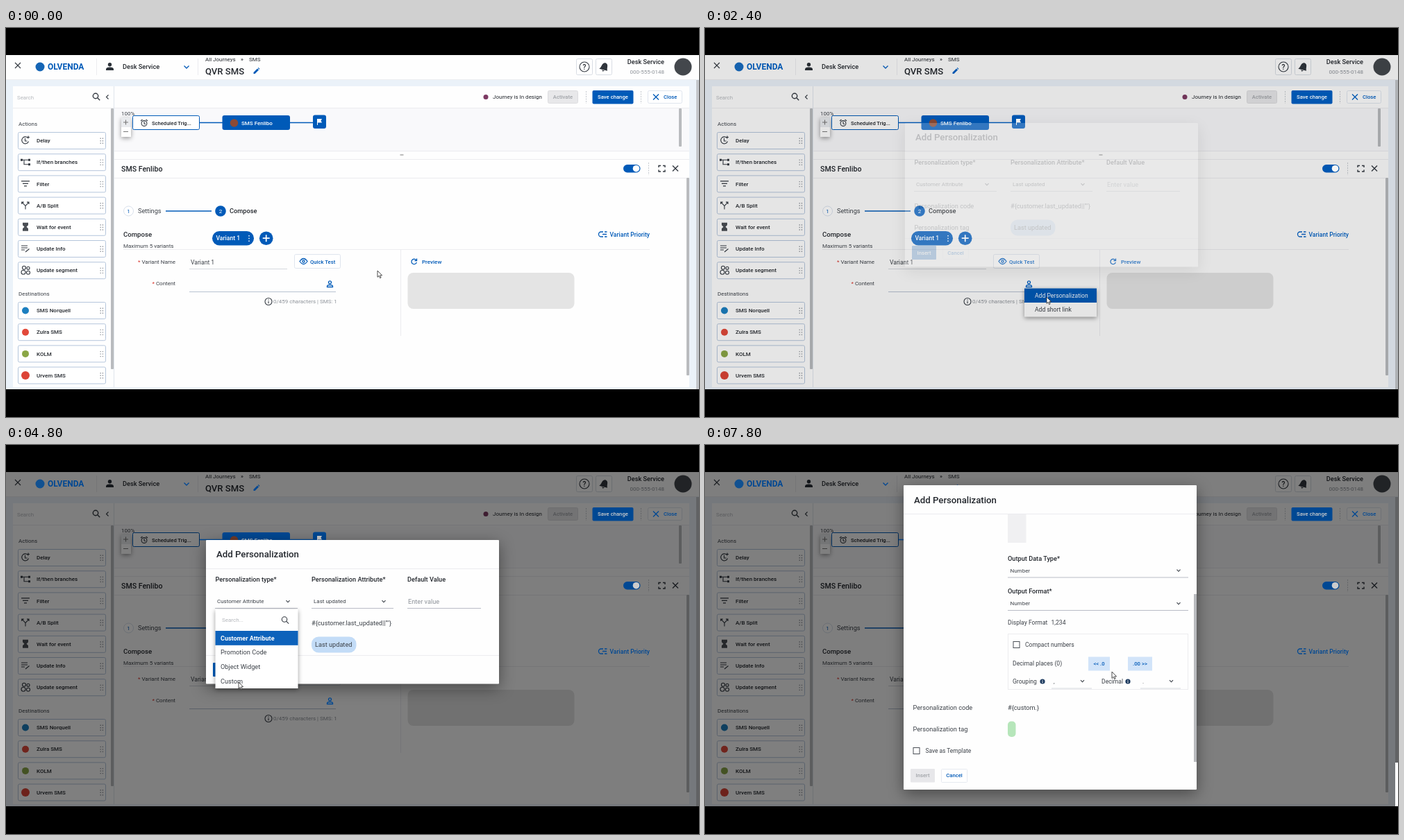
Write an HTML page that moves like this. It is 998 px wide and 561 px high and loops after 8 s.

```html
<!DOCTYPE html>
<html lang="en">
<head>
<meta charset="utf-8">
<title>Add personalization</title>
<style>
html, body { margin: 0; width: 100%; height: 100%; overflow: hidden; background: #000; }
svg { display: block; width: 998px; height: 561px; }
text { font: 8px Roboto, "Open Sans", sans-serif; fill: #3c4148; }
.b { font-weight: 500; fill: #23272d; }
.s { font-size: 7.7px; }
.l { font-size: 8.6px; }
.m { font-size: 9.2px; }
.h { font-size: 13.1px; }
.blue { fill: #005ab8; }
.white { fill: #fff; }
.grey { fill: #8d9299; }
.pale { fill: #b4b7bc; }
.red { fill: #d8342c; }
.mid { text-anchor: middle; }
.end { text-anchor: end; }
.ln { fill: none; stroke: #343a42; stroke-width: 1.1; }
.bl { fill: none; stroke: #005ab8; stroke-width: 1.3; }
.rule { fill: none; stroke: #ececef; }
.under { fill: none; stroke: #b9bcc6; }
.box { fill: #fff; stroke: #dfe5ee; }
.bar { fill: #b9bbbe; }
.pane { filter: drop-shadow(0 6px 11px rgba(0,0,0,.42)); }
.drop { filter: drop-shadow(0 2px 3px rgba(0,0,0,.4)); }

.anim { animation: 8s step-end infinite; }
.menu { animation-name: menu; }
.hover { animation-name: hover; }
.dim { animation-name: dim; }
.lit { animation-name: lit; }
.first { animation-name: first; }
.list { animation-name: list; }
.second { animation-name: second; }
.strip { animation-name: strip; }
.scroll { animation-name: scroll; }
.thumb { animation-name: thumb; }
.cursor { animation-name: cursor; }

@keyframes menu { 0% { opacity: 0 } 17.5% { opacity: 1 } 32.5%, 100% { opacity: 0 } }
@keyframes hover { 0% { opacity: 0 } 22.5%, 100% { opacity: 1 } }
@keyframes dim { 0% { opacity: 0 } 30% { opacity: .2 } 32.5%, 100% { opacity: 1 } }
@keyframes lit { 0% { filter: brightness(1) } 30% { filter: brightness(.96) } 32.5%, 100% { filter: brightness(.8) } }
@keyframes first { 0% { opacity: 0 } 30% { opacity: .2 } 32.5% { opacity: 1 } 65%, 100% { opacity: 0 } }
@keyframes list { 0% { opacity: 0 } 47.5% { opacity: .92 } 50% { opacity: 1 } 62.5%, 100% { opacity: 0 } }
@keyframes second { 0% { opacity: 0 } 65%, 100% { opacity: 1 } }
@keyframes strip { 0% { opacity: 0 } 67.5%, 100% { opacity: 1 } }
@keyframes scroll { 0% { transform: none } 92.5%, 100% { transform: translateY(-171px) } }
@keyframes thumb { 0% { transform: none } 92.5%, 100% { transform: translateY(115px) } }
@keyframes cursor {
  0% { transform: translate(535px, 350px); animation-timing-function: steps(6) }
  15% { transform: translate(466px, 366px) }
  17.5% { transform: translate(466px, 366px); animation-timing-function: steps(3) }
  25% { transform: translate(492px, 388px) }
  32.5% { transform: translate(492px, 388px); animation-timing-function: steps(5) }
  45% { transform: translate(391px, 227px) }
  47.5% { transform: translate(391px, 227px); animation-timing-function: steps(5) }
  60% { transform: translate(335px, 342px) }
  85% { transform: translate(335px, 342px); animation-timing-function: steps(2) }
  90%, 100% { transform: translate(586px, 327px) }
}
</style>
</head>
<body>
<svg viewBox="0 0 998 561">
<defs>
  <g id="card">
    <rect x=".5" y=".5" width="126" height="24" rx="2" fill="#fff" stroke="#b5c6dc"/>
    <path d="M119.2 8.5v9M122.4 8.5v9" stroke="#8d9299" stroke-width="1.3" stroke-dasharray="1.4 2.1"/>
  </g>
  <path id="chev" class="ln" d="M-2.5-1.3 0 1.3 2.5-1.3"/>
  <path id="cross" d="M-4-4 4 4M4-4-4 4"/>
  <g id="lens" fill="none"><circle r="3.7"/><path d="M2.8 2.8 6.2 6.2"/></g>
  <rect id="check" width="9" height="9" fill="#fff" stroke="#4a4f56"/>
  <g id="info"><circle r="3.6" fill="#1d3a5f"/><path d="M0-2v1M0-.3v2.4" stroke="#fff"/></g>
  <clipPath id="view"><rect x="286" y="100" width="422" height="357"/></clipPath>
</defs>

<!-- page -->
<rect y="39" width="998" height="482" fill="#ebf2f9"/>
<rect y="39" width="998" height="35" fill="#fefefe"/>
<path class="rule" d="M0 74.5H994"/>
<rect x="994" y="75" width="4" height="446" fill="#c3c6ca"/>
<rect x="10" y="84" width="145" height="434" fill="#fefefe"/>
<rect x="156" y="84" width="828" height="434" fill="#fefefe"/>
<rect x="156" y="116" width="828" height="61" fill="#f9f9fb"/>
<path class="rule" d="M10 115.5H155M156 115.5H984M156 177.5H984M156 189.5H984M156 216.5H980M130.500 44v24M276.500 44v24M169 319.500H568M568 319.500H927"/>
<path d="M155.500 84V518" stroke="#dfe5ec"/>
<rect class="bar" x="151" y="116" width="4" height="376" rx="1"/>
<rect class="bar" x="969" y="116" width="4" height="55" rx="1"/>
<rect class="bar" x="980" y="216" width="4" height="285" rx="1"/>

<!-- header -->
<use href="#cross" x="17" y="54" class="ln"/>
<circle cx="149.500" cy="52.800" r="2.700" fill="#2b3138"/>
<path d="M144 61v-1.500q0-3 5.500-3t5.500 3V61z" fill="#2b3138"/>
<text class="b m" x="168" y="58.800">Desk Service</text>
<text class="b" x="287" y="47.800" style="font-weight:400">All Journeys</text>
<text class="b" x="338" y="47.800">»</text>
<text class="b" x="350" y="47.800" style="font-weight:400">SMS</text>
<text class="b h" x="287" y="66.500">QVR SMS</text>
<g fill="#fff" stroke="#d8dde4">
  <rect x="821.500" y="44.500" width="23" height="23" rx="2"/>
  <rect x="849.500" y="44.500" width="23" height="23" rx="2"/>
</g>
<circle class="ln" cx="833" cy="56" r="7"/>
<text class="b mid" x="833" y="59.700" style="font-size:10px">?</text>
<path d="M855 60q2-2 2.500-5 1-4.500 4.500-5 4 .5 4 5.500 0 3 1 5zM859 61h4l-2 2z" fill="#30353c" transform="rotate(12 861 56)"/>
<text class="b m end" x="948" y="52">Desk Service</text>
<text class="grey end" x="948" y="66">000-555-0148</text>
<circle cx="975" cy="56" r="12.500" fill="#43474c"/>

<!-- sidebar -->
<text class="pale" x="16" y="102.600" style="font-size:7.800px">Search</text>
<use href="#lens" x="129" y="98" class="ln" style="stroke-width:1.400"/>
<path class="ln" d="M147.500 96.500l-3 3 3 3"/>
<text x="18" y="140.500">Actions</text>
<text x="18" y="386">Destinations</text>
<g transform="translate(17 150)"><use href="#card"/><path class="ln" d="M14.500 8.500a5 5 0 1 0 1 5M10.500 9v4h3M15 5.500v4M13 7.500h4"/><text class="b" x="27" y="15.300">Delay</text></g>
<g transform="translate(17 181.200)"><use href="#card"/><path class="ln" d="M6 9h10M9 9v6.500h7"/><path d="M4 7.500h3v3H4zM15 7.500h3v3h-3zM15 14h3v3h-3z" fill="#343a42"/><text class="b" x="27" y="15.300">If/then branches</text></g>
<g transform="translate(17 212.400)"><use href="#card"/><path class="ln" d="M5 8.500h12M7 12h8M9 15.500h4"/><text class="b" x="27" y="15.300">Filter</text></g>
<g transform="translate(17 243.600)"><use href="#card"/><path class="ln" d="M11 18v-5L6 7.500M11 13l5-5.500M5.700 10.500v-3h3M13 7.500h3v3"/><text class="b" x="27" y="15.300">A/B Split</text></g>
<g transform="translate(17 274.800)"><use href="#card"/><path d="M7 6h8v3.500L12.500 12l2.500 2.500V18H7v-3.500L9.500 12 7 9.500z" fill="#4a4e54"/><text class="b" x="27" y="15.300">Wait for event</text></g>
<g transform="translate(17 306)"><use href="#card"/><path class="ln" d="M5 8h9M5 11h9M5 14h5M11 17l5.500-4.500"/><text class="b" x="27" y="15.300">Update Info</text></g>
<g transform="translate(17 337.200)"><use href="#card"/><g class="ln"><circle cx="9" cy="8.500" r="2.500"/><circle cx="15" cy="9" r="2"/><circle cx="8" cy="15" r="3"/><circle cx="15" cy="15.500" r="2.500"/></g><text class="b" x="27" y="15.300">Update segment</text></g>
<g transform="translate(17 395)"><use href="#card"/><circle cx="11" cy="12.500" r="5" fill="#1c7fc0"/><text class="b" x="27" y="15.300">SMS Norquell</text></g>
<g transform="translate(17 426.200)"><use href="#card"/><circle cx="11" cy="12.500" r="5" fill="#e2493a"/><text class="b" x="27" y="15.300">Zulra SMS</text></g>
<g transform="translate(17 457.400)"><use href="#card"/><circle cx="11" cy="12.500" r="5" fill="#8aa646"/><text class="b" x="27" y="15.300">KOLM</text></g>
<g transform="translate(17 488.500)"><use href="#card"/><circle cx="11" cy="12.500" r="6" fill="#dc4437"/><text class="b" x="27" y="15.300">Urvem SMS</text></g>
<path d="M10 516H151v2H10z" fill="#fefefe"/>

<!-- toolbar -->
<circle cx="691" cy="99.500" r="3.500" fill="#7d3a63"/>
<text class="b" x="701" y="102.400" style="font-weight:400">Journey is In design</text>
<rect x="780.500" y="90.500" width="43" height="18" rx="2" fill="#e8e8ea" stroke="#dcdcdf"/>
<text class="b s mid" x="802" y="102.400" style="fill:#a0a3a8">Activate</text>
<path d="M835.500 91v18M914.500 91v18M925.500 194v18" stroke="#c5c9cf" stroke-dasharray="2 1.500"/>
<rect class="box" x="924.500" y="90.500" width="49" height="18" rx="2"/>

<!-- journey -->
<text x="166" y="126">100%</text>
<rect class="drop" x="166" y="129" width="14" height="28" fill="#fff"/>
<path d="M166 129h14v14h-14z" fill="#e9ebee"/>
<path class="ln" d="M169 136h7M172.500 132.500v7M169 149.500h7" style="stroke:#777"/>
<rect x="182.500" y="126.500" width="96" height="20" rx="2" fill="#fff" stroke="#005ab8"/>
<circle class="ln" cx="199" cy="137.500" r="3.900"/>
<path class="ln" d="M199 135v2.800l2 1M194 134l2.500-2M204 134l-2.500-2"/>
<text class="b" x="210" y="139.800" style="font-size:7.600px">Scheduled Trig...</text>
<path class="ln" d="M567.500 183h5" style="stroke:#888"/>

<!-- editor -->
<text class="b" x="166" y="206.800" style="font-size:10.600px">SMS Fenlibo</text>
<path class="ln" d="M940 201v-2.500h3M946 198.500h3v2.500M949 204.500v2.500h-3M943 207h-3v-2.500" style="stroke-width:1.400"/>
<use href="#cross" x="964" y="202.500" class="ln" style="stroke-width:1.400"/>
<circle cx="176.500" cy="264" r="7" fill="#fff" stroke="#d9e1ec"/>
<text class="blue mid" x="176.500" y="267">1</text>
<text class="m" x="190" y="267.400">Settings</text>
<path class="bl" d="M230 264H296"/>
<text class="b m" x="322" y="267.400">Compose</text>
<text class="b" x="169" y="300.700" style="font-size:9.600px">Compose</text>
<text x="169" y="316.600">Maximum 5 variants</text>
<text class="end" x="244" y="340"><tspan class="red">* </tspan>Variant Name</text>
<text class="l" x="266" y="340.600">Variant 1</text>
<path class="rule" d="M264 347.500H405" style="stroke:#d5d8de"/>
<rect class="box" x="415.500" y="326.500" width="66" height="20" rx="2"/>
<text class="end" x="244" y="371.400"><tspan class="red">* </tspan>Content</text>
<path class="rule" d="M264 380.500H475" style="stroke:#b8c2d2"/>
<circle class="ln" cx="378" cy="394.500" r="5"/>
<path class="ln" d="M378 391.500v1.200M378 394v3.300"/>
<text class="grey" x="385" y="397.300">0/459 characters | SMS: 1</text>
<path class="rule" d="M568.500 320V444"/>
<rect x="578.500" y="353" width="240" height="52" rx="8" fill="#e4e4e4"/>

<!-- content menu -->
<g class="anim menu">
  <rect class="drop" x="460" y="375.500" width="104" height="41" fill="#fff"/>
  <text class="l" x="475" y="389">Add Personalization</text>
  <g class="anim hover">
    <rect x="460" y="375.500" width="104" height="20.500" fill="#005ab8"/>
    <text class="l white" x="475" y="389">Add Personalization</text>
  </g>
  <text class="l" x="475" y="409.300">Add short link</text>
</g>

<rect class="anim dim" y="39" width="998" height="482" fill="rgba(0,0,0,.5)"/>

<!-- accents that stay vivid when the page is dimmed -->
<g class="anim lit">
  <circle cx="49" cy="56" r="6.500" fill="#1565b5"/>
  <text class="blue" x="60" y="60.400" style="font-size:12px;font-weight:700">OLVENDA</text>
  <path class="bl" d="M256.500 54.500l3.500 3.500 3.500-3.500"/>
  <path d="M356.500 66v-2l5.500-5.500 2 2-5.500 5.500zM362.700 57.800l.8-.8 2 2-.8.800z" fill="#005ab8"/>
  <rect x="844.500" y="90" width="59" height="19.500" rx="2" fill="#005ab8"/>
  <text class="b s mid white" x="874" y="102.400">Save change</text>
  <use href="#cross" x="936" y="99.500" class="bl"/>
  <text class="b s blue" x="947" y="102.400">Close</text>
  <path class="bl" d="M279 136.500H312M409 136.500H443"/>
  <rect x="311.500" y="126" width="97.500" height="21" rx="3" fill="#005ab8"/>
  <circle cx="328.500" cy="137" r="5.800" fill="#8c4a35"/>
  <text class="b white" x="339" y="139.900">SMS Fenlibo</text>
  <rect x="442" y="125.500" width="19" height="19.500" rx="3" fill="#005ab8"/>
  <path d="M448 140v-9h7l-1.500 2.700 1.500 2.700h-6v3.600z" fill="#fff"/>
  <rect x="889" y="197" width="24.500" height="11.500" rx="5.700" fill="#005ab8"/>
  <circle cx="907.500" cy="202.700" r="4.800" fill="#fff"/>
  <circle cx="309" cy="264" r="7.800" fill="#005ab8"/>
  <text class="white mid" x="309" y="267">2</text>
  <rect x="297" y="293" width="60" height="20.500" rx="10.200" fill="#005ab8"/>
  <text class="b l white" x="302.500" y="306.200">Variant 1</text>
  <path d="M350 299v9" stroke="#fff" stroke-width="1.500" stroke-dasharray="1.500 2.200"/>
  <circle cx="374.700" cy="303.200" r="9.800" fill="#005ab8"/>
  <path d="M369.700 303.200h10M374.700 298.200v10" stroke="#fff" stroke-width="1.700"/>
  <path class="bl" d="M860 294h-3a3.500 3.500 0 0 0 0 7h3M859 297.500h6M862 294h3.500M862 301h3.500"/>
  <text class="b l blue" x="869.500" y="300.600">Variant Priority</text>
  <path class="bl" d="M423 336.500q5.500-8 11 0-5.500 8-11 0z"/>
  <circle class="bl" cx="428.500" cy="336.500" r="1.600"/>
  <text class="b s blue" x="438" y="339.600">Quick Test</text>
  <path class="bl" d="M590.500 334.500a3.700 3.700 0 1 0 .8 3.300M591.500 332.500v3h-3"/>
  <text class="b blue" x="599" y="339.900">Preview</text>
  <circle class="bl" cx="466.500" cy="366.800" r="2"/>
  <path class="bl" d="M462.500 373.500v-1q0-2 4-2t4 2v1z"/>
</g>
<path class="anim strip" d="M994 458h4v63h-4z" fill="#fff"/>

<!-- attribute dialog -->
<g class="anim first">
  <rect class="pane" x="288" y="137" width="422" height="207.500" rx="1" fill="#fefefe"/>
  <path class="rule" d="M288 178.500H710M288 303.500H710"/>
  <text class="b" x="303" y="162" style="font-size:13.200px">Add Personalization</text>
  <text class="b m" x="301.500" y="197.300">Personalization type*</text>
  <text class="b m" x="440" y="197.300">Personalization Attribute*</text>
  <text class="b m" x="578" y="197.300">Default Value</text>
  <text x="304" y="228.400">Customer Attribute</text>
  <text x="443" y="228.400">Last updated</text>
  <text class="m grey" x="579" y="228.800">Enter value</text>
  <use href="#chev" x="406" y="225.500"/><use href="#chev" x="544" y="225.500"/>
  <path class="under" d="M301 235.500H420M440 235.500H558M578 235.500H684"/>
  <text class="m" x="301.500" y="259.800">Personalization code</text>
  <text class="m" x="440" y="259.800">#{customer.last_updated||""}</text>
  <text class="m" x="301.500" y="291.300">Personalization tag</text>
  <rect x="440" y="276.500" width="64.500" height="23" rx="10" fill="#c3dcf7"/>
  <text class="m" x="445" y="291.300">Last updated</text>
  <rect x="298" y="314" width="35" height="20" rx="1" fill="#005ab8"/>
  <text class="b s mid white" x="315.500" y="326.800">Insert</text>
  <rect class="box" x="342.500" y="314.500" width="37" height="19" rx="1" style="stroke:#eceff3"/>
  <text class="b s mid blue" x="361" y="326.800">Cancel</text>
  <g class="anim list">
    <rect class="drop" x="301.500" y="237" width="119" height="114" fill="#fff"/>
    <text class="pale" x="311" y="255.300">Search...</text>
    <use href="#lens" x="401" y="251.500" class="ln"/>
    <rect x="301.500" y="268" width="119" height="20.800" fill="#0d62bb"/>
    <text class="white" x="309" y="281.500" style="font-size:9px;font-weight:700">Customer Attribute</text>
    <text class="m" x="309" y="302.300">Promotion Code</text>
    <text class="m" x="309" y="323.200">Object Widget</text>
    <text class="m" x="309" y="343.800">Custom</text>
  </g>
</g>

<!-- custom function dialog -->
<g class="anim second">
  <rect class="pane" x="286" y="58" width="422" height="439" rx="1" fill="#fefefe"/>
  <text class="b" x="301" y="83.800" style="font-size:13.200px">Add Personalization</text>
  <path class="rule" d="M286 99.500H708"/>
  <g clip-path="url(#view)">
    <g class="anim scroll">
      <text class="b m" x="299.500" y="119.300">Personalization type*</text>
      <text x="302" y="149.900">Custom</text>
      <use href="#chev" x="402" y="147"/>
      <path class="under" d="M299 157H416M436 156.500H696M436 362H696M436 409.500H696"/>
      <text class="b m" x="436" y="119.300">Personalization Name*</text>
      <text class="l pale" x="436" y="149.500">Custom function name...</text>
      <text class="b m" x="436" y="176">Function</text>
      <circle class="ln" cx="482" cy="172.500" r="5.200"/>
      <text class="b mid" x="482" y="175.500">?</text>
      <rect x="436" y="182" width="26.500" height="130" fill="#f0f0f2"/>
      <path d="M462 182.500h234v10H462z" fill="#eeeeef"/>
      <path d="M436 182.500h26.500v10H436z" fill="#e0e1e4"/>
      <text class="mid" x="452" y="190.400" style="font-family:'Noto Sans Mono',monospace">1</text>
      <path d="M466 183v9" stroke="#999" stroke-width=".8"/>
      <text class="b m" x="436" y="338.200">Output Data Type*</text>
      <text x="439.500" y="354.900">Number</text>
      <use href="#chev" x="682" y="352"/>
      <text class="b m" x="436" y="385.300">Output Format*</text>
      <text x="439.500" y="402.400">Number</text>
      <use href="#chev" x="682" y="399.500"/>
      <text class="l" x="436" y="429.500">Display Format</text>
      <text class="l" x="498.500" y="429.500">1,234</text>
      <rect class="rule" x="436.500" y="443.500" width="259" height="80"/>
      <use href="#check" x="444" y="454.500"/>
      <text class="l" x="461" y="462">Compact numbers</text>
      <text class="l" x="443" y="489.300">Decimal places (0)</text>
      <path d="M552 476.500h31v20h-31zM609 476.500h35v20h-35z" fill="#d2e4f9"/>
      <text class="b s mid blue" x="567.500" y="489">&lt;&lt; .0</text>
      <text class="b s mid blue" x="626.500" y="489">.00 &gt;&gt;</text>
      <text class="l" x="443" y="514.500">Grouping</text>
      <use href="#info" x="486" y="512"/>
      <text x="502" y="514.500">,</text>
      <use href="#chev" x="543.500" y="511.500"/>
      <text class="l" x="571" y="514.500">Decimal</text>
      <use href="#info" x="609" y="512"/>
      <text x="630" y="514.500">.</text>
      <use href="#chev" x="671.500" y="511.500"/>
      <path class="rule" d="M499 522H557M627 522H685" style="stroke:#d5d8de"/>
      <text class="m" x="299.500" y="552.800">Personalization code</text>
      <text class="m" x="436" y="552.800">#{custom.}</text>
      <text class="m" x="299.500" y="583.800">Personalization tag</text>
      <rect x="436" y="569.500" width="11.500" height="22.500" rx="5" fill="#b6e6ba"/>
      <use href="#check" x="300" y="607.500"/>
      <text x="317.500" y="615" style="font-size:8.400px">Save as Template</text>
    </g>
    <rect class="bar anim thumb" x="704" y="100" width="4" height="242"/>
  </g>
  <rect x="296" y="467" width="35" height="19.500" rx="1" fill="#e7e7ea"/>
  <text class="b s mid" x="313.500" y="479.400" style="fill:#a0a3a8">Insert</text>
  <rect class="box" x="340.500" y="467.500" width="37" height="19" rx="1" style="stroke:#e6eaf0"/>
  <text class="b s mid blue" x="359" y="479.400">Cancel</text>
</g>

<path class="anim cursor" d="M0 0V9.300L2.100 7.300 3.600 10.700 5.100 10 3.700 6.800H6.600z" fill="#fff" stroke="#222" stroke-width=".8"/>
<path d="M0 0H998V39H0zM0 521H998V561H0z" fill="#000"/>
</svg>
</body>
</html>
```
